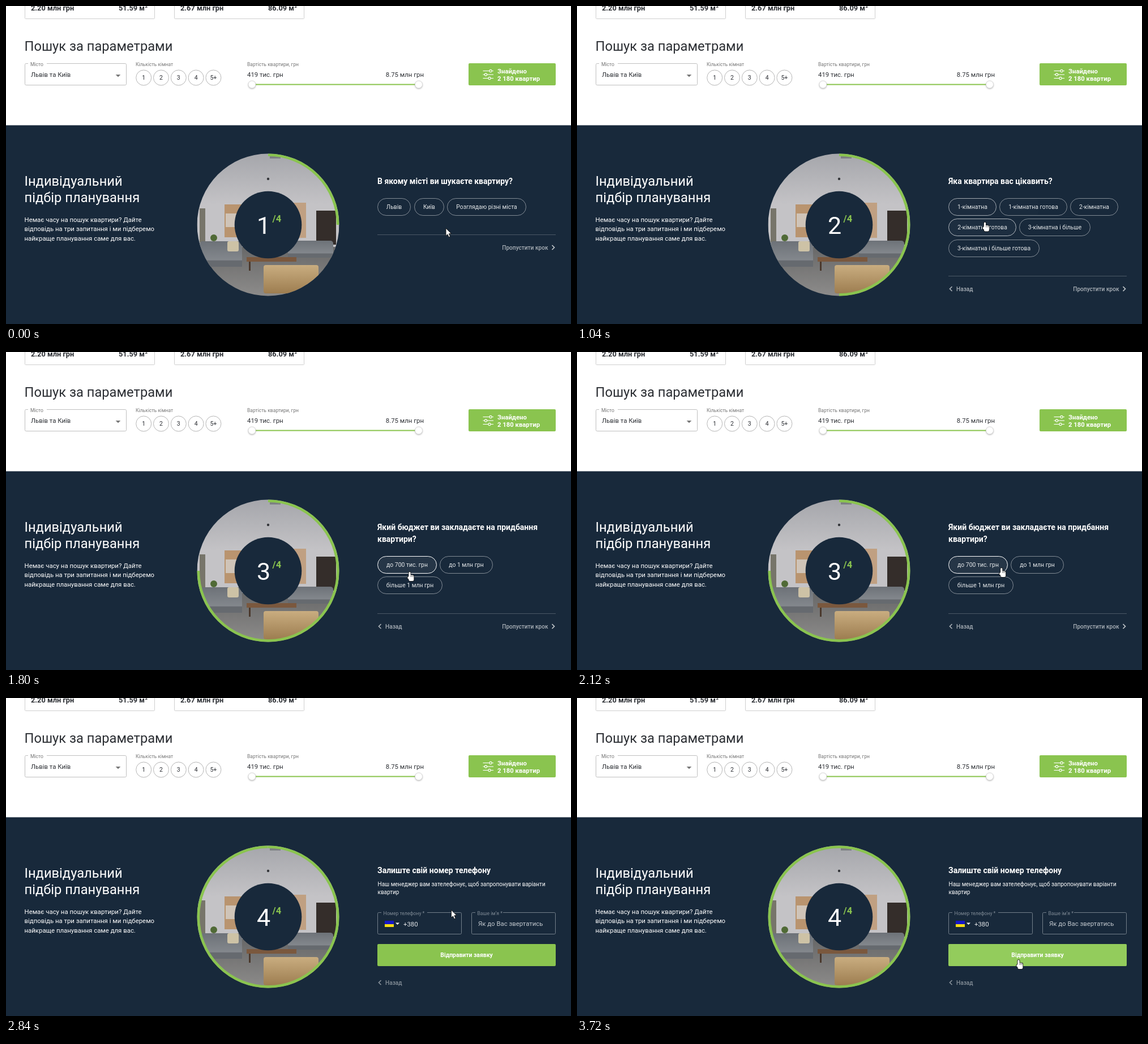
Recreate the animation shown at these times as an HTML page with a canvas. Size 998 by 561 pixels, loop 3.76 s.

```html
<!DOCTYPE html>
<html lang="uk">
<head>
<meta charset="utf-8">
<title>Підбір планування</title>
<style>
html, body { margin: 0; width: 100%; height: 100%; overflow: hidden; background: #fff; }
canvas { display: block; width: 998px; height: 561px; }
</style>
</head>
<body>
<canvas id="stage" width="998" height="561"></canvas>
<script>
const ctx = document.getElementById('stage').getContext('2d');
const LOOP = 3760, TICK = 40;
const NAVY = '#18293b', GREEN = '#8ac44f', INK = '#2b2e33', MUTED = '#777';
const LEFT = 656, WIDTH = 315;            // right-hand column
const CX = 463, CY = 386, RADIUS = 125.5; // photo wheel

// ---------- helpers ----------
const font = (size, weight = 400) => `${weight} ${size}px Roboto, sans-serif`;
function text(str, x, y, size, color, weight, align = 'left') {
  ctx.font = font(size, weight);
  ctx.fillStyle = color;
  ctx.textAlign = align;
  ctx.fillText(str, x, y);
}
function rect(x, y, w, h, color) {
  ctx.fillStyle = color;
  ctx.fillRect(x, y, w, h);
}
function paint(fill, stroke, width = 1) {
  if (fill) { ctx.fillStyle = fill; ctx.fill(); }
  if (stroke) { ctx.strokeStyle = stroke; ctx.lineWidth = width; ctx.stroke(); }
}
function trace(points) {
  ctx.beginPath();
  points.forEach(p => ctx.lineTo(...p));
}
function disc(x, y, r, fill, stroke, width) {
  ctx.beginPath();
  ctx.arc(x, y, r, 0, Math.PI * 2);
  paint(fill, stroke, width);
}
function round(x, y, w, h, r, fill, stroke) {
  ctx.beginPath();
  ctx.roundRect(x, y, w, h, r);
  paint(fill, stroke);
}
function fade(y0, y1, from, to) {
  const g = ctx.createLinearGradient(0, y0, 0, y1);
  g.addColorStop(0, from);
  g.addColorStop(1, to);
  return g;
}
function caret(x, y, size, color) {
  trace([[x - size, y], [x + size, y], [x, y + size]]);
  paint(color);
}
const white = alpha => `rgba(255,255,255,${alpha})`;
const clamp = v => Math.min(1, Math.max(0, v));
const smooth = v => v * v * (3 - 2 * v);

function bezier(x1, y1, x2, y2) {
  const at = (a, b, s) => 3 * a * s * (1 - s) ** 2 + 3 * b * s * s * (1 - s) + s ** 3;
  return v => {
    let lo = 0, hi = 1;
    for (let i = 0; i < 20; i++) {
      const mid = (lo + hi) / 2;
      if (at(x1, x2, mid) < v) lo = mid; else hi = mid;
    }
    return at(y1, y2, lo);
  };
}
const ease = bezier(.25, .1, .25, 1);
const easeInOut = bezier(.4, 0, .2, 1);

// ---------- wizard steps ----------
const PILL_H = 30, PILL_GAP = 5.5, ROW = 36.5, PILL_FONT = 10.4;

// Places the answers like a wrapping row under the title
function makeStep(start, title, labels) {
  let x = LEFT, y = 339 + (title.length - 1) * 21;
  ctx.font = font(PILL_FONT);
  const pills = labels.map(label => {
    const w = ctx.measureText(label).width + 32;
    if (x + w > LEFT + WIDTH) { x = LEFT; y += ROW; }
    const pill = { label, x: Math.round(x) + .5, y: Math.floor(y) + .5, w: Math.round(w) - 1, h: PILL_H };
    x += w + PILL_GAP;
    return pill;
  });
  return { start, title, pills, divider: Math.round(y + 64) };
}
const steps = [
  makeStep(0, ['В якому місті ви шукаєте квартиру?'], ['Львів', 'Київ', 'Розглядаю різні міста']),
  makeStep(640, ['Яка квартира вас цікавить?'],
    ['1-кімнатна', '1-кімнатна готова', '2-кімнатна', '2-кімнатна готова',
     '3-кімнатна і більше', '3-кімнатна і більше готова']),
  makeStep(1440, ['Який бюджет ви закладаєте на придбання', 'квартири?'],
    ['до 700 тис. грн', 'до 1 млн грн', 'більше 1 млн грн']),
  { start: 2560, pills: [{ x: LEFT, y: 434, w: WIDTH, h: 39 }] }
];
const stepAt = t => steps.findLastIndex(s => t >= s.start);

// ---------- pointer motion ----------
const stops = [
  { x: 777, y: 392, from: 0, to: 80 },
  { x: 754, y: 352, from: 440, to: 720 },
  { x: 713, y: 388, from: 1160, to: 1880 },
  { x: 786.5, y: 374, from: 2360, to: 3000 },
  { x: 780, y: 462, from: 3520, to: LOOP }
];
function pointer(t) {
  const i = stops.findLastIndex(s => t >= s.from);
  const a = stops[i], b = stops[i + 1] || a;
  const k = b === a ? 0 : smooth(clamp((t - a.to) / (b.from - a.to)));
  return [a.x + (b.x - a.x) * k, a.y + (b.y - a.y) * k];
}
function hovered(t) {
  const [x, y] = pointer(t);
  return steps[stepAt(t)].pills.findIndex(
    p => x >= p.x && x <= p.x + p.w && y >= p.y && y <= p.y + p.h);
}
function hoverLevel(t, index) {
  let hits = 0;
  for (let k = 0; k < 8; k++) if (hovered(Math.max(0, t - k * 25)) === index) hits++;
  return hits / 8;
}

// ---------- search page ----------
function card(x, price, area) {
  round(x + .5, -20.5, 229, 43, 1, null, '#cfcfcf');
  text(price, x + 11, 8, 12.8, INK, 700);
  text(area, x + 212, 8, 12.8, INK, 700, 'right');
  text('2', x + 212.5, 3, 8, INK, 700);
}
function searchPanel() {
  card(33, '2.20 млн грн', '51.59 м');
  card(297, '2.67 млн грн', '86.09 м');
  text('Пошук за параметрами', 32.5, 79, 23.7, INK);

  round(33.5, 101.5, 179, 38, 2, null, '#bfbfbf');
  rect(39, 100, 33, 4, '#fff');
  text('Місто', 43, 106, 8.6, MUTED);
  text('Львів та Київ', 44, 125, 11.4, INK);
  caret(198, 121, 4.3, '#757575');

  text('Кількість кімнат', 229, 105.5, 8.6, MUTED);
  ['1', '2', '3', '4', '5+'].forEach((n, i) => {
    const x = 243.2 + i * 30.8;
    disc(x, 126.5, 13.5, null, '#b5b5b5');
    text(n, x, 130.3, 10.5, INK, 400, 'center');
  });

  text('Вартість квартири, грн', 426, 105.5, 8.6, MUTED);
  text('419 тис. грн', 426, 125, 11.4, INK);
  text('8.75 млн грн', 738, 125, 11.4, INK, 400, 'right');
  rect(434, 137.5, 295, 2, GREEN);
  for (const x of [434.5, 729]) {
    ctx.save();
    ctx.shadowColor = 'rgba(0,0,0,.35)';
    ctx.shadowBlur = 3;
    ctx.shadowOffsetY = 1;
    disc(x, 138.5, 6.5, '#fff');
    ctx.restore();
    disc(x, 138.5, 6.5, null, '#d0d0d0', .7);
  }

  round(817, 101, 154, 39, 2, GREEN);
  [856, 847.5, 854].forEach((knob, i) => {
    const y = 114.5 + i * 6.5;
    trace([[842.5, y], [861, y]]);
    paint(null, '#fff', 1.1);
    disc(knob, y, 2.1, GREEN, '#fff', 1.1);
  });
  text('Знайдено', 868, 118.5, 11.3, '#fff', 700);
  text('2 180 квартир', 868, 131.8, 11.3, '#fff', 700);
}

// ---------- photo wheel ----------
function sofa(x, w, y, h) {
  round(x, y, w, h, 5, fade(y, y + h, '#6d7278', '#8b8f94'));
  rect(x, y + h * .75, w, h * .25, '#666a6f');
}
function room() {
  const left = CX - RADIUS, width = RADIUS * 2;
  ctx.save();
  ctx.beginPath();
  ctx.arc(CX, CY, RADIUS, 0, Math.PI * 2);
  ctx.clip();
  rect(left, 260, width, 170, fade(260, 350, '#a5a6ab', '#c4c3c6'));
  rect(left, 425, width, 90, fade(425, 510, '#686868', '#8c8b8a'));
  rect(466, 265, 19, 4, '#7d7f84');
  disc(CX, 305, 2.2, '#34363a');

  rect(342, 357, 10, 60, '#77756a');
  rect(386, 350, 42, 58, '#b9946f');
  rect(388, 366, 20, 24, '#cfc4b8');
  rect(500, 347, 30, 62, '#c0a082');
  rect(548, 361, 35, 60, '#342d2a');
  disc(367, 409, 6, '#506a36');

  sofa(342, 75, 415, 45);
  sofa(498, 80, 414, 30);
  round(391, 415, 20, 18, 3, '#cdc2a6');
  rect(425, 443, 88, 8, '#7a583e');
  rect(429, 451, 3, 16, '#4a382c');
  round(455, 457, 97, 50, 4, fade(457, 507, '#c9ad80', '#9d7d50'));
  ctx.restore();
}
function progress(t) {
  const i = stepAt(t);
  return i ? .25 * (i + ease(clamp((t - steps[i].start) / 300))) : .25;
}
function wheel(t) {
  room();
  ctx.beginPath();
  ctx.arc(CX, CY, 123.2, -Math.PI / 2, (progress(t) * 2 - .5) * Math.PI);
  paint(null, GREEN, 4.6);
  disc(CX, CY, 59.3, NAVY);
  text(stepAt(t) + 1, 455, 402, 43, '#fff', 400, 'center');
  text('/4', 470.5, 381, 16.5, GREEN, 700);
}

// ---------- question panel ----------
function chevron(x, y, dir, color) {
  trace([[x - 2 * dir, y - 4], [x + 2 * dir, y], [x - 2 * dir, y + 4]]);
  paint(null, color, 1.7);
}
function backLink(y, color) {
  chevron(660.5, y, -1, color);
  text('Назад', 670, y + 4, 10.1, color, 500);
}
// A ripple keeps the size of the answer that was pressed, even when its label changes
function ripple(t, pill, index) {
  for (const press of [480, 1320, 2480]) {
    const age = t - press;
    if (age < 0 || age > 680 || hovered(press) !== index) continue;
    const source = steps[stepAt(press)].pills[index];
    const dx = pointer(press)[0] - source.x;
    const radius = Math.hypot(Math.max(dx, source.w - dx) + 1, PILL_H / 2 + 1);
    const alpha = .25 * (1 - easeInOut(clamp((age - 130) / 550)));
    ctx.save();
    ctx.beginPath();
    ctx.roundRect(pill.x, pill.y, pill.w, pill.h, 15);
    ctx.clip();
    disc(pill.x + dx, pill.y + 15, radius * easeInOut(clamp(age / 550)), white(alpha));
    ctx.restore();
  }
}
function question(t, step) {
  step.title.forEach((s, i) => text(s, LEFT, 314 + i * 21, 14, '#fff', 700));
  step.pills.forEach((p, i) => {
    const level = hoverLevel(t, i);
    round(p.x, p.y, p.w, p.h, 15, white(.06 * level), white(.45 + .55 * level));
    ripple(t, p, i);
    text(p.label, p.x + p.w / 2, p.y + 18.6, PILL_FONT, '#e6e9eb', 400, 'center');
  });
  rect(LEFT, step.divider, WIDTH, 1, '#4b5866');
  const y = step.divider + 23;
  if (step.start) backLink(y, '#a9b0b7');
  text('Пропустити крок', 957.5, y + 4, 10.1, '#a9b0b7', 500, 'right');
  chevron(966.5, y, 1, '#c3c8cc');
}
function field(x, label, gap) {
  round(x + .5, 378.5, 148, 38, 2, null, '#737f8a');
  rect(x + 7, 377, gap, 4, NAVY);
  text(label, x + 10.5, 382.5, 8.6, '#7f8a95');
}
function contactForm(t) {
  text('Залиште свій номер телефону', LEFT, 309, 14, '#fff', 700);
  text('Наш менеджер вам зателефонує, щоб запропонувати варіанти', LEFT + .5, 331.5, 10, '#fff');
  text('квартир', LEFT + .5, 346, 10, '#fff');
  field(LEFT, 'Номер телефону *', 81);
  field(822, 'Ваше ім’я *', 49);
  rect(669, 393, 16, 6, '#1717c9');
  rect(669, 399, 16, 5, '#f8dc13');
  caret(691.5, 396.5, 3.5, '#fff');
  text('+380', 702, 403, 11.4, '#e4e7e9');
  text('Як до Вас звертатись', 834, 402, 11.4, '#c2c8ce');
  const { x, y, w, h } = steps[3].pills[0];
  round(x, y, w, h, 2, GREEN);
  round(x, y, w, h, 2, `rgba(160,215,110,${.4 * hoverLevel(t, 0)})`);
  text('Відправити заявку', x + w / 2, y + 23, 10.4, '#fff', 700, 'center');
  backLink(502, '#87919a');
}

// ---------- pointer shape ----------
function arrowCursor() {
  trace([[0, 0], [0, 13.5], [3, 10.8], [5.2, 15.7], [7.6, 14.7], [5.4, 9.8], [9.5, 9.6]]);
  ctx.closePath();
  paint('#fff', '#111', .9);
}
function handCursor() {
  const shape = new Path2D();
  shape.roundRect(-1.6, 0, 3.2, 12, 1.6);
  shape.roundRect(-3.6, 8, 5, 4.5, 2);
  shape.roundRect(-1.6, 5.5, 9, 10.5, 2.5);
  ctx.strokeStyle = '#111';
  ctx.lineWidth = 1.6;
  ctx.stroke(shape);
  ctx.fillStyle = '#fff';
  ctx.fill(shape);
  for (let x = 1.6; x < 6; x += 2) rect(x, 6, .6, 3, '#333');
}
function cursor(t) {
  ctx.save();
  ctx.translate(...pointer(t));
  if (hovered(t) >= 0) handCursor(); else arrowCursor();
  ctx.restore();
}

function draw(t) {
  rect(0, 0, 998, 561, '#fff');
  searchPanel();
  rect(0, 210.4, 998, 351, NAVY);
  text('Індивідуальний', 32.5, 317, 23.7, '#fff');
  text('підбір планування', 32.5, 346, 23.7, '#fff');
  ['Немає часу на пошук квартири? Дайте',
   'відповідь на три запитання і ми підберемо',
   'найкраще планування саме для вас.'
  ].forEach((s, i) => text(s, 32.5, 380.5 + i * 16.6, 11.4, '#fff'));
  wheel(t);
  const step = steps[stepAt(t)];
  if (step.title) question(t, step); else contactForm(t);
  cursor(t);
}

const begin = performance.now();
function frame() {
  const t = (performance.now() - begin) % LOOP;
  draw(Math.floor(t / TICK) * TICK);
  requestAnimationFrame(frame);
}
frame();
</script>
</body>
</html>
```
